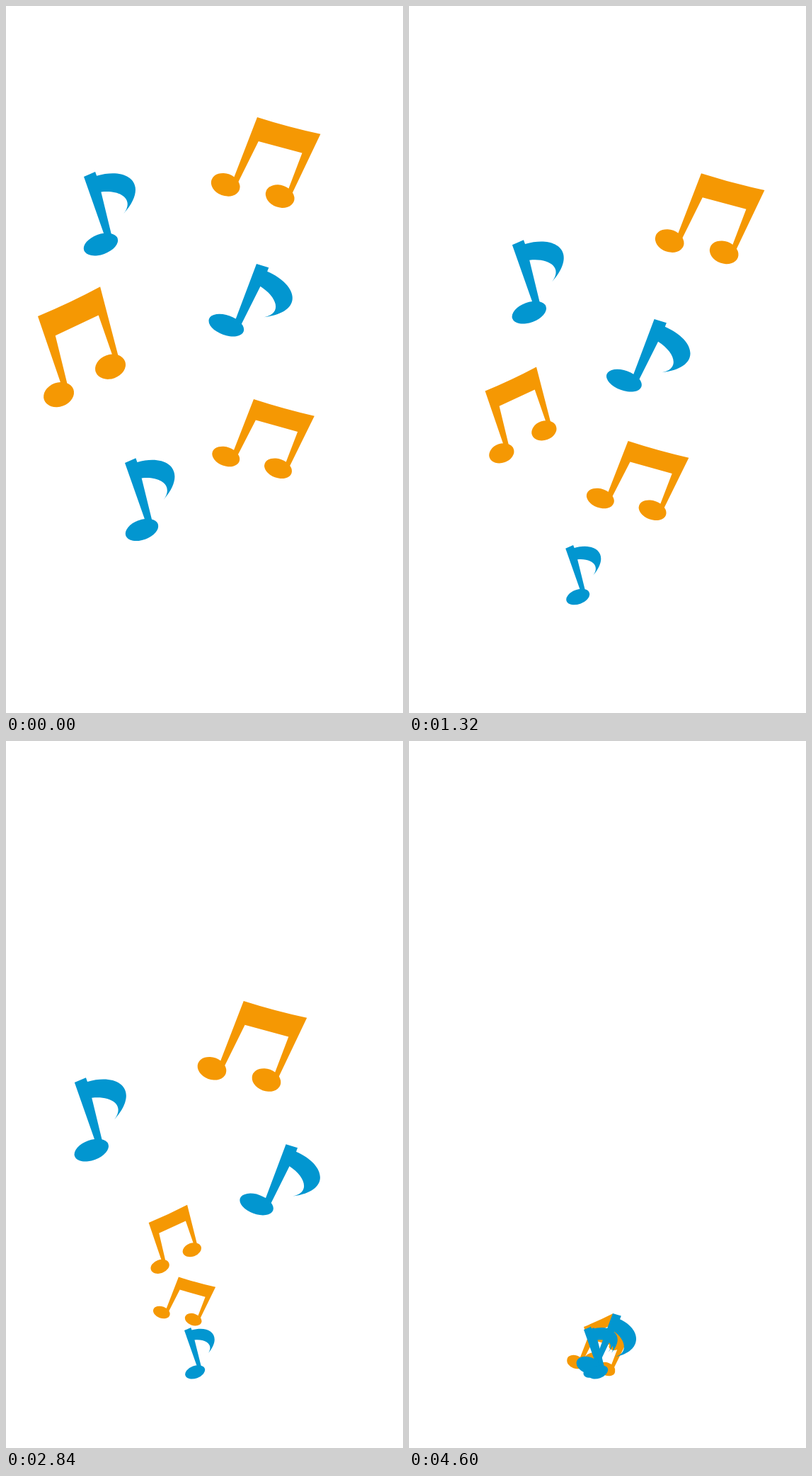
Write an HTML page that moves like this. It is 561 px wide and 998 px high and loops after 5.72 s.

```html
<!DOCTYPE html>
<html lang="en">
<head>
<meta charset="utf-8">
<title>Falling notes</title>
<style>
  html, body { margin: 0; width: 100%; height: 100%; overflow: hidden; background: #fff; }
  svg { display: block; width: 100%; height: 100%; }
</style>
</head>
<body>
<svg id="stage" viewBox="0 0 561 998">
  <defs>
    <g id="beamed" fill="#f59803">
      <path d="M0 0Q49 -2 97 -9L87 98L80 96L81 28L14 34L6 108L-2 106Z"/>
      <ellipse cx="-10" cy="114" rx="22" ry="17"/>
      <ellipse cx="72" cy="102" rx="22" ry="17"/>
    </g>
    <g id="flagged" fill="#0296d0">
      <path d="M0 0L18 -1L18 5C66 8 87 41 36 67C59 53 43 34 16 28L9 88L-1 88Z"/>
      <ellipse cx="-10.5" cy="96" rx="26" ry="14"/>
    </g>
  </defs>
</svg>
<script>
const LOOP = 5720, STEP = 40, TILT = 20;

// Each note drifts along path points [time, x, y] of its stem top and shrinks
// linearly from one [width, height] scale to another during the shrink interval.
const notes = [
  { shape: 'beamed', tilt: -TILT, from: [1, 1], to: [0.47, 0.39], shrink: [0, 3920],
    path: [[0, 45, 438], [880, 91, 497], [1760, 126, 590], [2360, 165, 635], [3280, 230, 731], [3920, 247, 827]] },
  { shape: 'beamed', tilt: TILT, from: [0.915, 0.785], to: [0.55, 0.48], shrink: [1620, 2860],
    path: [[0, 350, 555], [880, 329, 585], [1760, 287, 651], [2360, 256, 712], [3280, 243, 791], [3920, 259, 826]] },
  { shape: 'beamed', tilt: TILT, from: [0.95, 0.92], to: [0.55, 0.48], shrink: [3700, 4600],
    path: [[0, 355, 157], [880, 388, 210], [1500, 415, 247], [1800, 399, 265], [2360, 350, 314],
      [3280, 341, 427], [3760, 362, 508], [3960, 357, 548], [4600, 259, 828]] },
  { shape: 'flagged', tilt: -TILT, from: [0.97, 1.02], to: [0.6, 0.62], shrink: [3680, 4600],
    path: [[0, 110, 241], [880, 154, 288], [1760, 127, 387], [2360, 100, 428], [2650, 86, 459],
      [3280, 149, 545], [3960, 172, 671], [4600, 247, 831]] },
  { shape: 'flagged', tilt: TILT, from: [1, 1], to: [0.68, 0.84], shrink: [2650, 3960],
    path: [[0, 354, 364], [880, 341, 397], [1760, 358, 489], [2360, 379, 527], [2700, 396, 556],
      [3280, 373, 621], [3960, 314, 757], [4200, 288, 808]] },
  { shape: 'flagged', tilt: -TILT, from: [0.93, 1.01], to: [0.56, 0.63], shrink: [0, 1800],
    path: [[0, 168, 645], [880, 203, 724], [1200, 215, 752], [1800, 252, 832]] }
];

const stage = document.getElementById('stage');
for (const note of notes) {
  note.element = document.createElementNS('http://www.w3.org/2000/svg', 'use');
  note.element.setAttribute('href', '#' + note.shape);
  stage.append(note.element);
}

const clamp = x => Math.min(1, Math.max(0, x));
const mix = (a, b, u) => a + (b - a) * u;

// Velocity at a path point: time-weighted average of its two neighbouring slopes.
function velocity(path, i, axis) {
  const slope = k => (path[k + 1][axis] - path[k][axis]) / (path[k + 1][0] - path[k][0]);
  if (i === 0) return slope(0);
  if (i === path.length - 1) return slope(i - 1);
  const weight = (path[i][0] - path[i - 1][0]) / (path[i + 1][0] - path[i - 1][0]);
  return mix(slope(i - 1), slope(i), weight);
}

function along(path, time, axis) {
  const next = path.findIndex(point => point[0] > time);
  if (next < 0) return path[path.length - 1][axis];
  const i = next - 1, span = path[next][0] - path[i][0];
  const u = (time - path[i][0]) / span, v = 1 - u;
  return mix(path[i][axis], path[next][axis], u * u * (3 - 2 * u)) +
    span * u * v * (velocity(path, i, axis) * v - velocity(path, next, axis) * u);
}

function draw(time) {
  for (const { element, tilt, from, to, shrink, path } of notes) {
    const u = clamp((time - shrink[0]) / (shrink[1] - shrink[0]));
    element.setAttribute('transform',
      `translate(${along(path, time, 1)} ${along(path, time, 2)}) rotate(${tilt}) ` +
      `scale(${mix(from[0], to[0], u)} ${mix(from[1], to[1], u)})`);
  }
}

const start = performance.now();
function tick() {
  const time = (performance.now() - start) % LOOP;
  draw(Math.floor(time / STEP) * STEP);
  requestAnimationFrame(tick);
}
tick();
</script>
</body>
</html>
```
